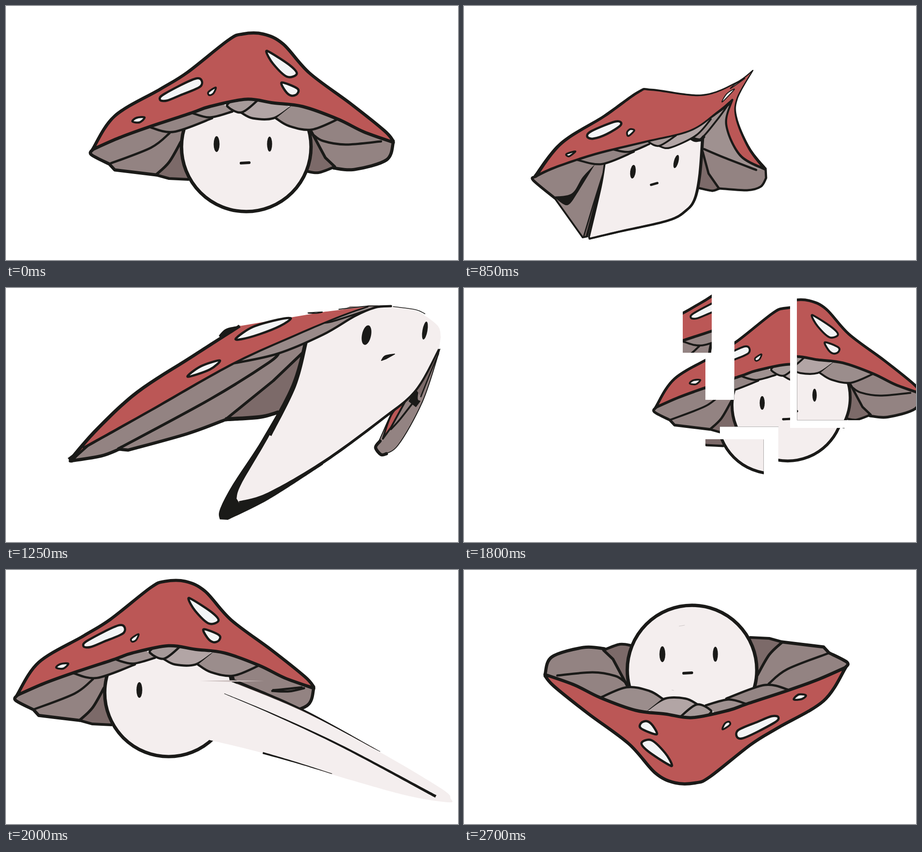
Recreate the animation shown at these times as an HTML page. Size 998 by 561 pixels, loop 3000 ms.

```html
<!DOCTYPE html>
<html lang="en">
<head>
<meta charset="utf-8">
<title>Mushroom</title>
<style>
html, body { margin: 0; width: 100%; height: 100%; overflow: hidden; background: #fff; }
svg { display: block; width: 100vw; height: 100vh; }
</style>
</head>
<body>
<svg id="stage" viewBox="0 0 998 561" preserveAspectRatio="none" stroke-linejoin="round" stroke-linecap="round"></svg>
<script>
const INK = '#1a1a18', RED = '#bb5756', FACE = '#f4eeee', SPOT = '#f3f5f6';
const GILL = '#938382', DARK = '#7c6a69', MID = '#9f9190', LIGHT = '#b2a5a5';

const points = text => text.trim().split(/\s+/).map(s => s.split(',').map(Number));

// Smooth curve through key points; "|" marks a corner, a trailing "z" closes the loop smoothly.
function curve(text) {
  const loop = text.endsWith('z');
  return text.replace('z', '').split('|').map((part, k) => {
    const p = points(part), n = p.length;
    const at = i => loop ? p[(i + n) % n] : p[Math.max(0, Math.min(n - 1, i))];
    let d = (k ? 'L' : 'M') + p[0];
    for (let i = 0; i < (loop ? n : n - 1); i++) {
      const [a, b, c, e] = [at(i - 1), at(i), at(i + 1), at(i + 2)];
      const c1 = [0, 1].map(j => b[j] + (c[j] - a[j]) / 6);
      const c2 = [0, 1].map(j => c[j] - (e[j] - b[j]) / 6);
      d += `C${c1} ${c2} ${c}`;
    }
    return d + (loop ? 'Z' : '');
  }).join('');
}

const path = (d, fill, w = 0) =>
  `<path d="${d}" fill="${fill}" ${w ? `stroke="${INK}" stroke-width="${w}"` : ''}/>`;
const line = (pts, w = 5) => path(curve(pts), 'none', w);
const fill = (pts, color, w = 0) => path(curve(pts) + 'Z', color, w);
const blob = (pts, w = 5) => path(curve(pts + 'z'), SPOT, w);

// A pen stroke whose width runs evenly from w0 to w1.
function ribbon(text, w0, w1) {
  const p = points(text), n = p.length - 1;
  const side = sign => p.map(([x, y], i) => {
    const a = p[Math.max(0, i - 1)], b = p[Math.min(n, i + 1)];
    const dx = b[0] - a[0], dy = b[1] - a[1];
    const r = sign * (w0 + (w1 - w0) * i / n) / 2 / Math.hypot(dx, dy);
    return [x - dy * r, y + dx * r];
  });
  return fill(side(1).join(' ') + '|' + side(-1).reverse().join(' '), INK);
}

// A filled flap whose outline runs only along its edge.
const gill = (edge, back, color, w = 5) =>
  path(`${curve(edge)}L${back}Z`, color) + line(edge, w);
const eye = (x, y, rx, ry, turn = 0) =>
  `<ellipse rx="${rx}" ry="${ry}" fill="${INK}" transform="translate(${x} ${y}) rotate(${turn})"/>`;
const group = (body, attrs) => `<g ${attrs}>${body}</g>`;
const move = (body, x, y) => group(body, `transform="translate(${x} ${y})"`);
const place = (id, x, y, s) =>
  `<use href="#${id}" transform="translate(${x} ${y}) scale(${s})"/>`;

function drawBody() {
  const top = '191,317 240,243 340,184 400,147 490,76 522,62 568,62 612,84 670,148 760,215 835,275 855,298';
  const rim = '855,301 790,278 733,250 655,222 590,214 530,206 450,222 410,236 316,267 250,291 191,317';
  return [
    gill('193,316 188,328 228,349|240,362 331,373', '400,340 400,220 210,285', GILL, 7),
    line('230,348 320,313 361,281'),
    gill('386,300 360,345 331,373|360,381 402,383', '400,300', DARK, 6),
    gill('724,358 770,361 840,340 855,302', '733,240 672,270 680,320', GILL, 7),
    gill('678,284 700,298 750,306 828,299', '733,240 672,265', GILL),
    gill('664,365 690,368 726,355|705,335 674,277', '650,300', DARK, 6),
    `<circle cx="530.5" cy="311" r="143" fill="${FACE}" stroke="${INK}" stroke-width="7.5"/>`,
    gill('316,267 370,278 455,248', '400,220', '#948584'),
    gill('410,236 450,246 500,233', '460,200', MID),
    gill('520,236 545,248 590,248 628,224', '560,190', LIGHT),
    gill('495,211 489,222 520,235 556,208', '525,190', '#a69a99'),
    gill('596,248 625,265 675,273 733,250', '650,205', '#9b8d8c'),
    fill(top + '|' + rim, RED, 7),
    blob('340,207 350,194 420,160 430,177 385,197 355,209'),
    blob('463,180 447,190 449,197 458,193', 4),
    blob('279,255 288,247 306,246 295,257', 4.5),
    blob('575,102 584,103 628,132 642,150 620,156 590,128'),
    blob('609,169 643,182 643,194 630,198 617,188')
  ].join('');
}

function drawSwept() {
  const top = '157,377 215,303 310,243 385,190 415,185 525,197 600,170 638,142';
  const back = '638,142 603,205 602,250 630,315 666,361';
  const inner = '666,361 610,330 579,262 593,206';
  const rim = '593,206 560,234 500,275 400,300 290,327 200,357 157,377';
  const cheek = '277,514 340,499 450,474 490,452 510,425 521,370 527,290';
  return [
    fill('527,296 592,208|578,240 610,330 666,361|667,380 655,399 625,407 565,403|548,408 519,402', GILL, 5),
    gill('530,316 575,335 645,362', '666,361 610,330 579,262 592,208 527,290', MID),
    gill('519,402 548,408 563,403|540,370 527,322', '515,340', DARK),
    fill('157,377 153,385 200,424|262,511|272,509|315,345|250,325', GILL, 4),
    line('157,377 153,385 200,424', 6),
    fill('264,510 285,440 307,370|270,509', DARK, 3),
    fill('198,421 238,414 262,378 289,350|251,412 228,440 198,421', INK),
    fill('311,346 302,400 276,510|' + cheek + '|400,290', FACE, 4),
    ribbon(cheek, 4, 7),
    gill('250,340 305,349 375,322', '370,290', '#948584', 4.5),
    gill('330,317 365,322 409,305', '390,285', MID, 4.5),
    gill('497,292 520,296 560,250 586,214', '500,270', MID, 4),
    ribbon('586,214 558,236 530,258', 9, 3),
    line('500,291 520,296 529,289', 7),
    gill('430,309 455,313 512,286 545,250', '540,235 450,270', LIGHT, 4),
    gill('404,298 430,309 468,286', '430,270', '#a69a99', 4),
    fill([top, back, inner, rim].join('|'), RED, 2),
    ribbon(top, 8, 2), ribbon(back, 2, 7), ribbon(inner, 6, 4), ribbon(rim, 3, 6),
    blob('272,288 282,276 335,255 346,263 315,283 285,293'),
    blob('367,272 376,275 363,287 360,279', 4),
    blob('226,327 246,321 232,332', 4),
    blob('570,212 580,194 597,184', 2),
    blob('589,182 598,173 620,160', 2),
    eye(373, 366, 6, 15, 7), eye(468.5, 343.5, 5, 15, 15),
    line('413,395 427,391')
  ].join('');
}

function drawLeaning() {
  const top = '141,381 200,313 290,230 410,152 516,84';
  const rim = '800,41 740,62 640,104 500,168 320,270 170,354';
  const left = '663,118 637,215 582,325 520,432 509,465';
  const bottom = '515,475 580,455 700,385 830,290 905,226 956,135';
  return [
    fill('958,135 920,250 865,348 828,368|816,355 850,278|920,200', GILL, 2),
    fill('832,333 852,278 890,235|850,308', RED, 4),
    line('850,312 870,290 905,245', 4),
    fill('914,204 908,243 914,250|905,262 890,250', INK, 2),
    gill('955,145 938,185 916,240', '906,225', DARK, 3),
    line('840,366 828,368 816,352 826,338', 7),
    fill('142,382 210,371 250,356|270,358 400,322 484,291|560,285 602,274|670,115|500,140|200,330', GILL, 7),
    line('248,355 450,246 580,165 604,141', 6),
    gill('602,274 560,285 484,291|590,205 658,140', '660,150 648,215 615,274', DARK, 6),
    ribbon('484,290 560,285 602,274', 9, 8),
    ribbon('141,381 155,368 172,354', 14, 6),
    fill('659,114 630,215 565,335 500,435 472,490 472,511|490,512 580,467 700,390|663,118', INK),
    fill(left + '|' + bottom + '|960,108 952,82 905,50 860,42 815,42 720,90 663,118', FACE),
    ribbon(left.split(' ').slice(0, 3).join(' '), 7, 9),
    ribbon(bottom, 8, 4),
    line('855,41 905,48 925,57', 1.5),
    gill('505,166 600,145 700,103 770,62 815,43 850,40', '800,38 650,75', '#998a89'),
    gill('688,76 720,74 815,43', '760,40', MID, 4),
    fill(top + '|700,53 800,41|' + rim, RED),
    ribbon(top, 8, 7), ribbon(rim, 3, 6),
    line('735,47 800,40 850,40', 2),
    fill('470,105 486,90 518,83|474,112', INK),
    blob('508,111 545,86 600,70 629,67 605,84 560,102 520,113'),
    blob('401,196 430,173 472,160 450,180'),
    blob('667,55 698,53 685,56', 2),
    eye(796, 104, 10, 22, 12), eye(925, 94, 5.5, 20, 10),
    fill('829,160 837,150 858,146|840,156', INK, 2)
  ].join('');
}

function drawSmeared() {
  return [
    place('one-eyed', -164.5, -36, .987),
    fill('504,240 540,234|588,250|588,267|575,277 520,270', GILL),
    line('588,267 625,268 658,261'),
    fill('495,240 655,308 826,401|650,322', DARK),
    fill('488,243 655,312 820,399 960,482 982,505 975,513 880,497 718,451 570,405 447,375', FACE),
    ribbon('495,241 655,309 826,401', 7, 1),
    ribbon('482,273 600,323 747,392 949,500', 1, 6),
    ribbon('567,404 640,425 720,450', 4, 1),
    path('M428 245L495 243.5L570 245L495 247Z', '#cbbfbe')
  ].join('');
}

const body = drawBody();
const leftEye = eye(465, 305, 6.5, 17.5);
const rightEye = eye(582, 305, 5.6, 16.5);
const mouth = line('519,347 537,346', 6);

// Loose tiles: where each is cut from and how far it slides.
const tiles = [
  ['M533 111h64v136h-64Z', -50, -104],
  ['M565 306h129v90h-129Z', -32, 28],
  ['M720 0H1000V309H720Z', 15, -17]
];

function drawShattered() {
  const whole = place('full', 258.5, -8.5, .86);
  const cut = (id, d) =>
    `<clipPath id="${id}"><path d="${d}" clip-rule="evenodd"/></clipPath>` +
    group(whole, `clip-path="url(#${id})"`);
  const holes = 'M0 0H998V561H0Z' + tiles[0][0] + tiles[1][0] + 'M720 0H1000V330H840V309H720Z';
  return cut('rest', holes) +
    tiles.map(([d, x, y], i) => move(cut('tile' + i, d), x, y)).join('') +
    '<path d="M565 306.5H694M661.5 335V405M735.5 152V292H838M596.5 200V247" fill="none" stroke="#777" stroke-width=".6"/>';
}

const flipped = group(body, 'transform="rotate(180 517 266)"') +
  move(leftEye + rightEye, -27, -119) + move(mouth, -34, -119) +
  '<path d="M475 124L487 122M459 265L463 266" stroke="#c9c3c3"/>';

// Start time and picture of each held pose.
const poses = [
  [0, '<use href="#full"/>'], [250, drawSwept()], [1250, drawLeaning()],
  [1500, drawShattered()], [2000, drawSmeared()], [2250, flipped]
];
const LOOP = 3000;

const stage = document.getElementById('stage');
stage.innerHTML =
  `<defs>${group(body + leftEye + rightEye + mouth, 'id="full"')}${group(body + leftEye, 'id="one-eyed"')}</defs>` +
  poses.map(p => group(p[1], 'class="pose"')).join('');
const layers = [...stage.querySelectorAll('.pose')];

function draw(t) {
  const now = poses.filter(p => p[0] <= t).length - 1;
  layers.forEach((g, i) => g.setAttribute('visibility', i === now ? 'visible' : 'hidden'));
}

const start = performance.now();
function tick() {
  draw((performance.now() - start) % LOOP);
  requestAnimationFrame(tick);
}
tick();
</script>
</body>
</html>
```
